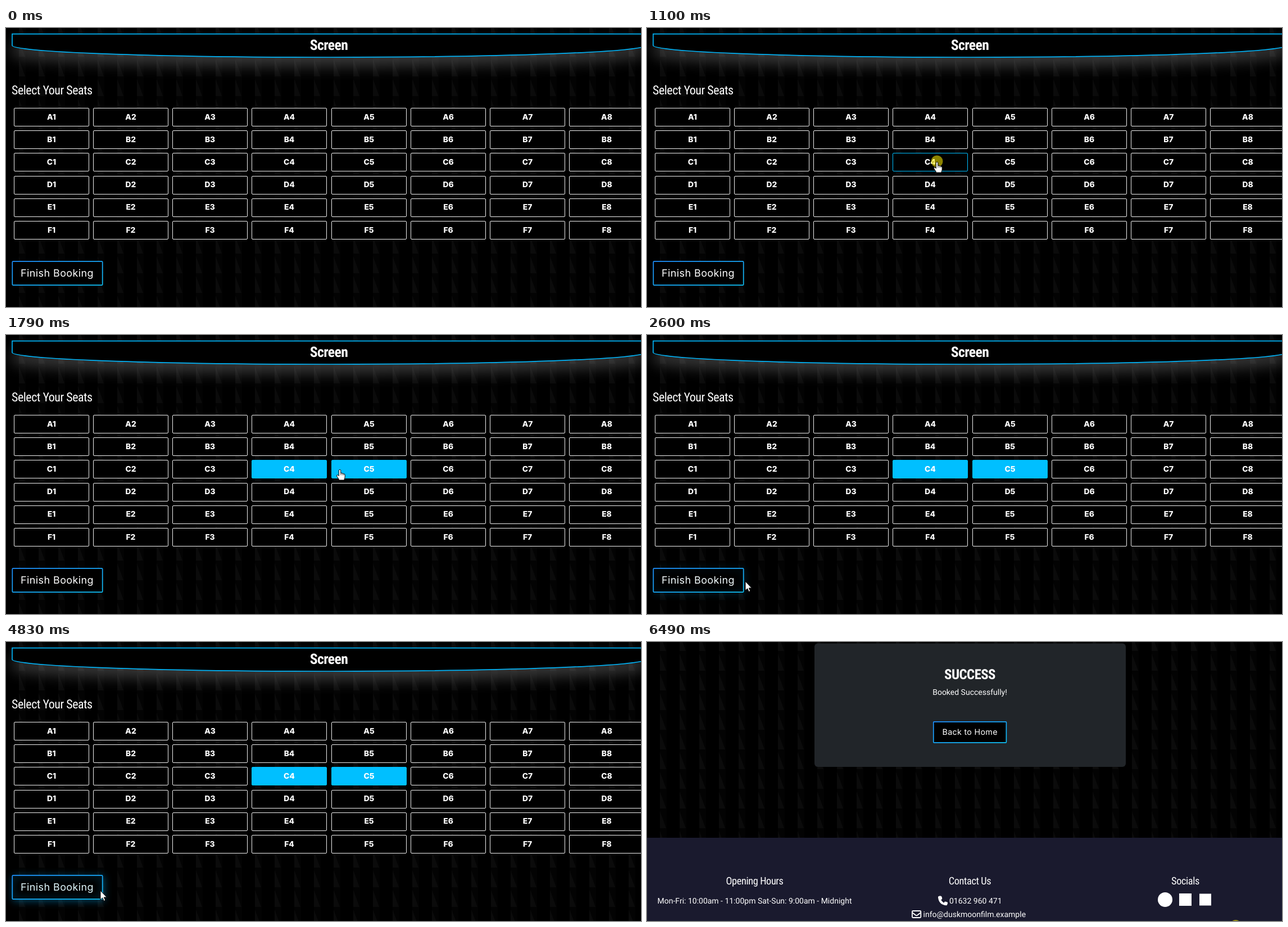
These frames come from a looping animation (1130 px wide and 496 px high, 6.57 s). An HTML page:

```html
<!DOCTYPE html>
<html lang="en">
<head>
<meta charset="utf-8">
<title>Seat booking</title>
<style>
html, body { margin: 0; width: 100%; height: 100%; overflow: hidden; background: #000; }
svg { display: block; width: 1130px; height: 496px; }
text { fill: #fff; white-space: pre; text-rendering: geometricPrecision; }
.head { font-family: "Barlow Condensed", "Roboto Condensed", Roboto, sans-serif; font-stretch: 75%; }
.wide { font-family: Montserrat, Inter, sans-serif; }
.body { font-family: Roboto, sans-serif; font-size: 14px; }
.mid { text-anchor: middle; }
.seat { font-size: 13.8px; font-weight: 800; }
</style>
</head>
<body>
<svg id="stage" viewBox="0 0 1130 496">
  <defs>
    <pattern id="saw" width="35" height="35" x="23" y="16" patternUnits="userSpaceOnUse">
      <rect width="35" height="35" fill="#000"/>
      <path d="M0 0H12V35H0Z" fill="#030303"/>
      <path d="M0 5L11 35H0Z" fill="#0b0b0b"/>
    </pattern>
    <linearGradient id="edge" x1="0" y1="0" x2="1" y2="1">
      <stop offset="0" stop-color="#1e90ff"/>
      <stop offset="1" stop-color="#0fc0f5"/>
    </linearGradient>
    <filter id="soft" x="-10%" y="-100%" width="120%" height="400%"><feGaussianBlur stdDeviation="13"/></filter>
    <filter id="halo" x="-30%" y="-100%" width="160%" height="300%"><feGaussianBlur stdDeviation="7"/></filter>
    <clipPath id="inside"><rect x="11" y="415" width="161" height="42"/></clipPath>
  </defs>
  <rect width="1130" height="496" fill="url(#saw)"/>

  <g id="booking">
    <path d="M11 10.7H1138V31A563.5 21 0 0 1 11 31Z" transform="translate(0 16)" fill="#fff" opacity=".22" filter="url(#soft)"/>
    <path d="M11 10.7H1138V31A563.5 21 0 0 1 11 31Z" stroke="#00b2f5" stroke-width="1.7"/>
    <g id="seats"></g>
    <g id="glow">
      <rect x="12" y="416" width="163" height="45" fill="#00a8f0" opacity=".4" filter="url(#halo)"/>
    </g>
    <rect x="11.3" y="414.8" width="160.4" height="42.4" rx="1.5"/>
    <g id="inner" clip-path="url(#inside)">
      <rect x="11" y="415" width="161" height="42" fill="none" stroke="#00a8f0" stroke-width="8" opacity=".2" filter="url(#halo)"/>
    </g>
    <rect x="11.3" y="414.8" width="160.4" height="42.4" rx="1.5" fill="none" stroke="url(#edge)" stroke-width="1.7"/>
  </g>

  <g id="success">
    <rect x="298" y="2.5" width="554" height="219.5" rx="6" fill="#212529"/>
    <rect x="509.8" y="141.8" width="129.6" height="37" rx="1" stroke="url(#edge)" stroke-width="1.7"/>
    <rect y="348" width="1130" height="148" fill="#1a1a2e"/>
    <path d="M521.5 451.2L524 452Q525.8 456 525 457L523.2 458.6Q525.2 462 528.2 463.7L530 461.6Q531 461 534.7 462.8Q535.4 463.3 535 464.6L534 467.4Q533.4 468.4 532 468.2Q519.4 467 518 454Q517.8 452.6 519 452.1Z" fill="#fff"/>
    <g fill="none" stroke="#fff" stroke-width="1.8" stroke-linejoin="round">
      <rect x="471.9" y="478" width="15.4" height="12" rx="1.5"/>
      <path d="M472 481L478.2 485.8Q479.6 486.8 481 485.8L487.2 481"/>
    </g>
    <g fill="#fff">
      <circle cx="922" cy="458" r="13"/>
      <rect x="947" y="447" width="22" height="22"/>
      <rect x="983" y="447.5" width="21" height="21"/>
    </g>
  </g>

  <circle id="click" r="10.5" fill="#ffee00" opacity=".55"/>
  <g id="cursor" fill="#fff" stroke="#000" stroke-width="1" stroke-linejoin="round">
    <path id="arrow" d="M0 0V16.2L3.8 12.8L6.2 18.4L8.8 17.3L6.4 11.9H11.4Z"/>
    <g id="hand">
      <path d="M-1.7 1.2Q0-1 1.7 1.2V6.6Q3.2 5.7 4.2 7.1Q5.8 6.3 6.7 8Q9.2 7.4 9.2 10V14Q8.7 16 7.7 19H-1.2Q-2 16.4-5 12.6Q-6.4 9.6-4 9.6Q-3 10-1.7 11.6Z"/>
      <path d="M1.7 6.6V10M4.2 7.1V10.4M6.7 8V10.6" stroke-width=".7"/>
    </g>
  </g>
</svg>
<script>
const LOOP = 6570, BLUE = '#00bfff';
const $ = id => document.getElementById(id);

function add(parent, tag, attrs, label) {
  const el = document.createElementNS('http://www.w3.org/2000/svg', tag);
  for (const k in attrs) el.setAttribute(k, attrs[k]);
  if (label) el.textContent = label;
  return parent.appendChild(el);
}

// Without a condensed face, headings use a smaller, tighter setting.
const probe = add($('stage'), 'text', { class: 'head', 'font-size': 24 }, 'Select Your Seats');
const probeWidth = probe.getComputedTextLength();
probe.remove();
const [ratio, tight] = probeWidth > 172 ? [.855, -.05] : probeWidth > 150 ? [.917, -.022] : [1, 0];

function heading(parent, label, x, y, size, weight = 400, mid = ' mid') {
  add(parent, 'text', { class: 'head' + mid, x, y, style:
    `font-size:${size * ratio}px;font-weight:${weight};letter-spacing:${tight}em` }, label);
}
function label(parent, text, x, y, cls, style = '') {
  return add(parent, 'text', { class: cls, x, y, style }, text);
}

const page1 = $('booking'), page2 = $('success');
heading(page1, 'Screen', 574.5, 38.5, 28, 600);
heading(page1, 'Select Your Seats', 10, 118, 24, 400, '');
const finish = label(page1, 'Finish Booking', 26, 442, 'wide', 'font-size:18px;letter-spacing:.4px');

heading(page2, 'SUCCESS', 574.5, 66, 27, 600);
label(page2, 'Booked Successfully!', 574.5, 93.5, 'body mid');
label(page2, 'Back to Home', 574.7, 165, 'wide mid', 'font-size:14.3px;letter-spacing:.3px');
heading(page2, 'Opening Hours', 191.5, 431, 20);
heading(page2, 'Contact Us', 574.5, 431, 20);
heading(page2, 'Socials', 958, 431, 20);
label(page2, 'Mon-Fri: 10:00am - 11:00pm Sat-Sun: 9:00am - Midnight', 191.5, 464.5, 'body mid');
label(page2, '01632 960 471', 538, 464.5, 'body');
label(page2, 'info@duskmoonfilm.example', 491.5, 489, 'body');

const seats = [];
[...'ABCDEF'].forEach((row, j) => {
  for (let i = 0; i < 8; i++) {
    const x = Math.round(14 + 141.15 * i), y = Math.round(142 + 40.2 * j), name = row + (i + 1);
    const box = add($('seats'), 'rect', { x: x + .5, y: y + .5, width: 133, height: 32, rx: 1.5 });
    label($('seats'), name, x + 67, 163 + 40.1 * j, 'wide mid seat');
    seats.push({ x, y, name, box });
  }
});

const ease = {
  lin: p => p,
  in: p => p * p,
  out: p => 1 - (1 - p) ** 2.4,
  both: p => p * p * (3 - 2 * p)
};
// Pointer legs: start, end, target x, target y, easing
const START = [1040, 492];
const LEGS = [
  [280, 950, 516, 238, 'both'],
  [1220, 1590, 594, 239, 'both'],
  [1840, 2320, 249, 416, 'in'],
  [2320, 2980, 148, 446, 'out'],
  [4120, 4160, 157, 446, 'lin'],
  [4590, 4700, 167.5, 442, 'both'],
  [4850, 5230, 500, 278, 'in'],
  [5230, 5270, 536, 324, 'lin'],
  [5270, 5780, 1019, 464, 'out'],
  [5980, 6040, 1042, 500, 'in']
];
const CLICKS = [[1060, 1160], [1670, 1760], [3450, 3550], [6490, 6570]];
const PICKS = { C4: 1160, C5: 1760 };
const PAGE_AT = 4870;

function pointer(t) {
  let [x, y] = START;
  for (const [a, b, tx, ty, kind] of LEGS) {
    if (t < a) break;
    const p = ease[kind](Math.min(1, (t - a) / (b - a)));
    x += (tx - x) * p;
    y += (ty - y) * p;
  }
  return [x, y];
}
const within = (x, y, l, t, w, h) => x >= l && x < l + w && y >= t && y < t + h;
const show = (el, on) => { el.style.display = on ? '' : 'none'; };

function render(t) {
  const [x, y] = pointer(t);
  const first = t < PAGE_AT, visible = t >= 280 && t < 6040;
  show(page1, first);
  show(page2, !first);

  let link = within(x, y, 11, 415, 161, 43);
  for (const s of seats) {
    const over = visible && within(x, y, s.x, s.y, 134, 33);
    const picked = t >= PICKS[s.name];
    s.box.setAttribute('fill', picked ? BLUE : '#000');
    s.box.setAttribute('stroke', picked || over ? BLUE : '#f0f0f0');
    link = link || over;
  }

  const lit = Math.max(0, Math.min(1, (t - 2480) / 300));
  $('glow').style.opacity = $('inner').style.opacity = lit;
  finish.style.fill = `rgb(${255 - 30 * lit},${255 - 5 * lit},255)`;

  const hand = link && first && t < 4600;
  show($('cursor'), visible);
  show($('hand'), hand);
  show($('arrow'), !hand);
  $('cursor').setAttribute('transform', `translate(${Math.round(x)} ${Math.round(y)})`);

  const last = t >= 6490;
  show($('click'), CLICKS.some(([a, b]) => t >= a && t < b));
  $('click').setAttribute('cx', last ? 1047.5 : x);
  $('click').setAttribute('cy', last ? 504.5 : y - 1);
}

const begin = performance.now();
function tick() {
  render((performance.now() - begin) % LOOP);
  requestAnimationFrame(tick);
}
tick();
</script>
</body>
</html>
```
